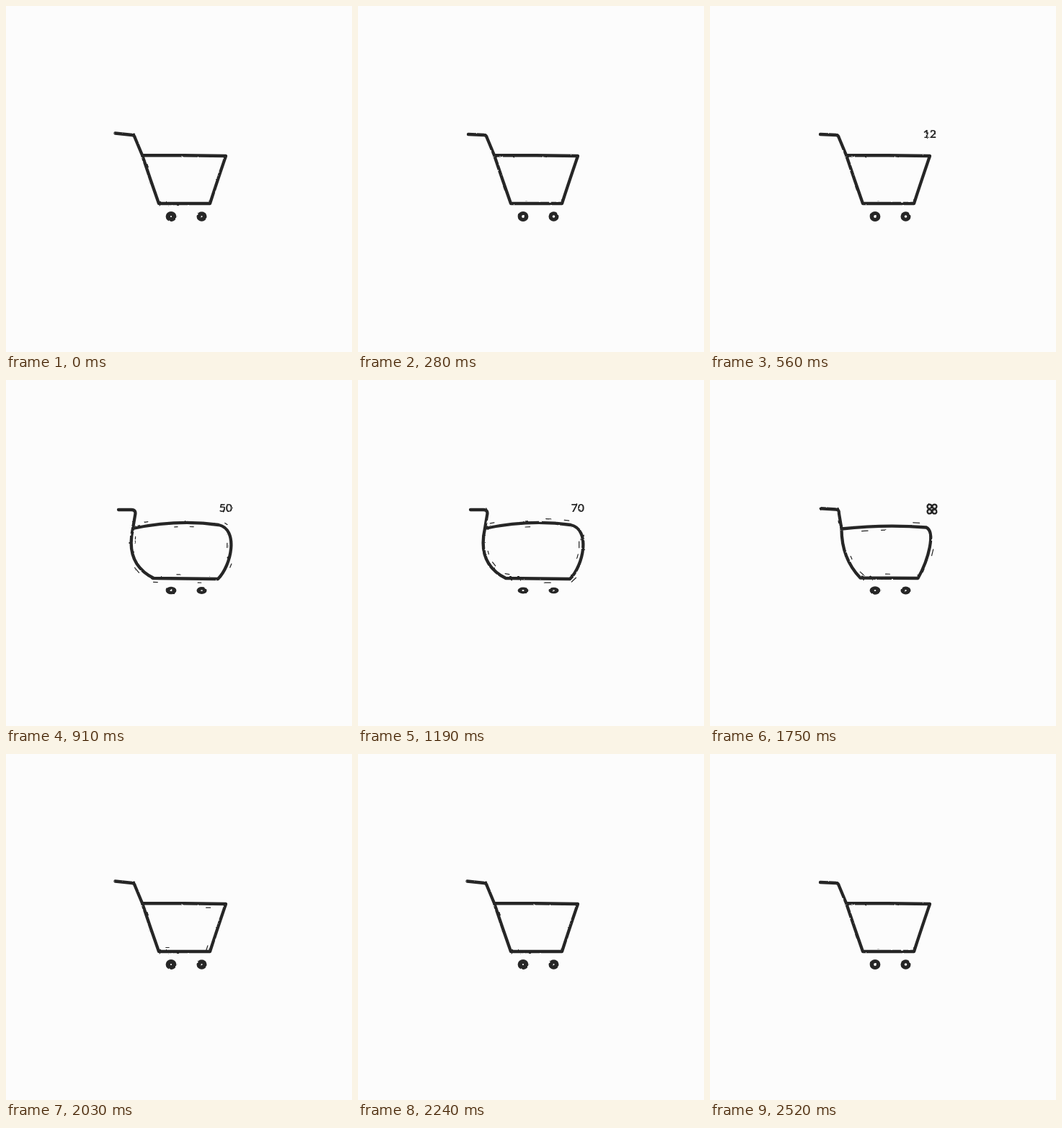
Recreate the animation shown at these times as an HTML page. Size 480 px wide and 480 px high, loop 2590 ms.

```html
<!DOCTYPE html>
<html lang="en">
<meta charset="utf-8">
<title>Filling cart</title>
<style>
  html, body { margin: 0; height: 100%; overflow: hidden; background: #fcfcfc; }
  svg { display: block; width: 100%; height: 100%; }
  path { fill: none; stroke: #262626; stroke-linecap: round; stroke-linejoin: round; }
  text { font: 700 16px Lato, sans-serif; fill: #262626; }
  .wheel { fill: #262626; }
  .hub { fill: #fcfcfc; }
</style>
<svg viewBox="0 0 480 480">
  <filter id="rough" filterUnits="userSpaceOnUse" x="130" y="130" width="230" height="190" color-interpolation-filters="sRGB">
    <feTurbulence id="noise" type="fractalNoise" baseFrequency=".16" numOctaves="2"/>
    <feDisplacementMap in="SourceGraphic" scale="2" xChannelSelector="R" yChannelSelector="G"/>
  </filter>
  <g filter="url(#rough)">
    <path id="cart" stroke-width="4.3"/>
    <path id="dashes" stroke-width="1.2"/>
    <path id="burst" stroke-width="2.4"/>
    <text id="count" x="295.5" y="182.5"></text>
    <g id="wheels"></g>
  </g>
</svg>
<script>
const TICK = 70, TICKS = 37;
const $ = id => document.getElementById(id);
const mix = (a, b, k) => a + (b - a) * k;
const clamp = x => Math.max(0, Math.min(1, x));
const random = n => { const x = Math.sin(n * 12.9898) * 43758.5453; return x - Math.floor(x); };

// Each stretch of the outline as [command, flat points, bulging points].
const outline = [
  ["M", [153, 178], [156, 180]],                                          // handle
  ["L", [175, 179], [174, 180]],
  ["Q", [178, 179, 179, 183], [181, 180, 179, 188]],
  ["L", [189, 207], [176, 206]],
  ["Q", [200, 240, 212, 274], [165, 255, 205, 275]],                      // left side
  ["L", [283, 274], [294, 276]],                                          // base
  ["C", [294, 240, 303, 214, 305, 208], [313, 257, 323, 207, 295, 201]],  // right side
  ["Q", [247, 207, 189, 207], [238, 193, 176, 206]]                       // rim
];

function cartPath(k, boil) {
  const lift = boil ? 0 : 1.5 * (1 - k);
  return outline.map(([command, flat, bulge], i) =>
    command + flat.map((v, j) => mix(v, bulge[j], k) - (i ? 0 : lift)).join(" ")).join("");
}

// Short marks scattered along the body, just inside or outside the line.
function dashPath(count, boil) {
  const cart = $("cart"), handle = 56, body = cart.getTotalLength() - handle;
  let d = "";
  for (let i = 0; i < count; i++) {
    const seed = i * 3 + boil * 50 + 1;
    const start = handle + body * (i + .8 * random(seed)) / count;
    const p = cart.getPointAtLength(start);
    const q = cart.getPointAtLength(start + 4 + 6 * random(seed + 1));
    const length = Math.hypot(q.x - p.x, q.y - p.y) || 1;
    const offset = (random(seed + 2) < .5 ? -5.5 : 5.5) / length;
    const dx = (q.y - p.y) * offset, dy = (p.x - q.x) * offset;
    d += `M${p.x + dx} ${p.y + dy}L${q.x + dx} ${q.y + dy}`;
  }
  return d;
}

// Four rings fly apart diagonally and shrink.
function burstPath(step) {
  if (step < 0 || step > 3) return "";
  const spread = 3.5 + 9 * step, r = 2.9 - .5 * step;
  let d = "";
  for (const sx of [-1, 1]) for (const sy of [-1, 1])
    d += `M${308 + sx * spread - r} ${179 + sy * spread}a${r} ${r} 0 1 0 ${2 * r} 0a${r} ${r} 0 1 0 ${-2 * r} 0`;
  return d;
}

const countKeys = [[4, 0], [8, 12], [13, 50], [21, 90]];
function counter(t) {
  if (t < 5 || t > 24) return "";
  if (t > 21) return "100%";
  const i = countKeys.findIndex(key => t <= key[0]);
  const [t0, v0] = countKeys[i - 1], [t1, v1] = countKeys[i];
  return Math.round(mix(v0, v1, (t - t0) / (t1 - t0)));
}

function wheel(x, size, k, boil) {
  const oval = (name, rx, ry) => `<ellipse class="${name}" cx="${x}" cy="292" rx="${rx * size}" ry="${ry * size}"/>`;
  const hub = boil ? 1.9 : 1.1;
  return oval("wheel", 7.4, mix(7, boil ? 5.3 : 4.4, k)) + oval("hub", mix(hub, 1.6, k), mix(hub, .9, k));
}

let shown = -1;
function frame(now) {
  const t = Math.floor(now / TICK) % TICKS;
  if (t !== shown) {
    shown = t;
    const k = Math.min(clamp((t - 8) / 4), clamp((27 - t) / 4));
    const phase = (t + 8) % TICKS % 5;
    const boil = phase === 1 || phase === 2 ? 1 : 0;
    $("noise").setAttribute("seed", boil + 1);
    $("cart").setAttribute("d", cartPath(k, boil));
    $("dashes").setAttribute("d", dashPath(t > 8 && t < 30 ? Math.round(3 + 8 * k) : 0, boil));
    $("burst").setAttribute("d", burstPath(t - 25));
    $("count").textContent = counter(t);
    $("wheels").innerHTML = wheel(229, 1, k, boil) + wheel(271.5, .95, k, boil);
  }
  requestAnimationFrame(frame);
}
frame(0);
</script>
</html>
```
